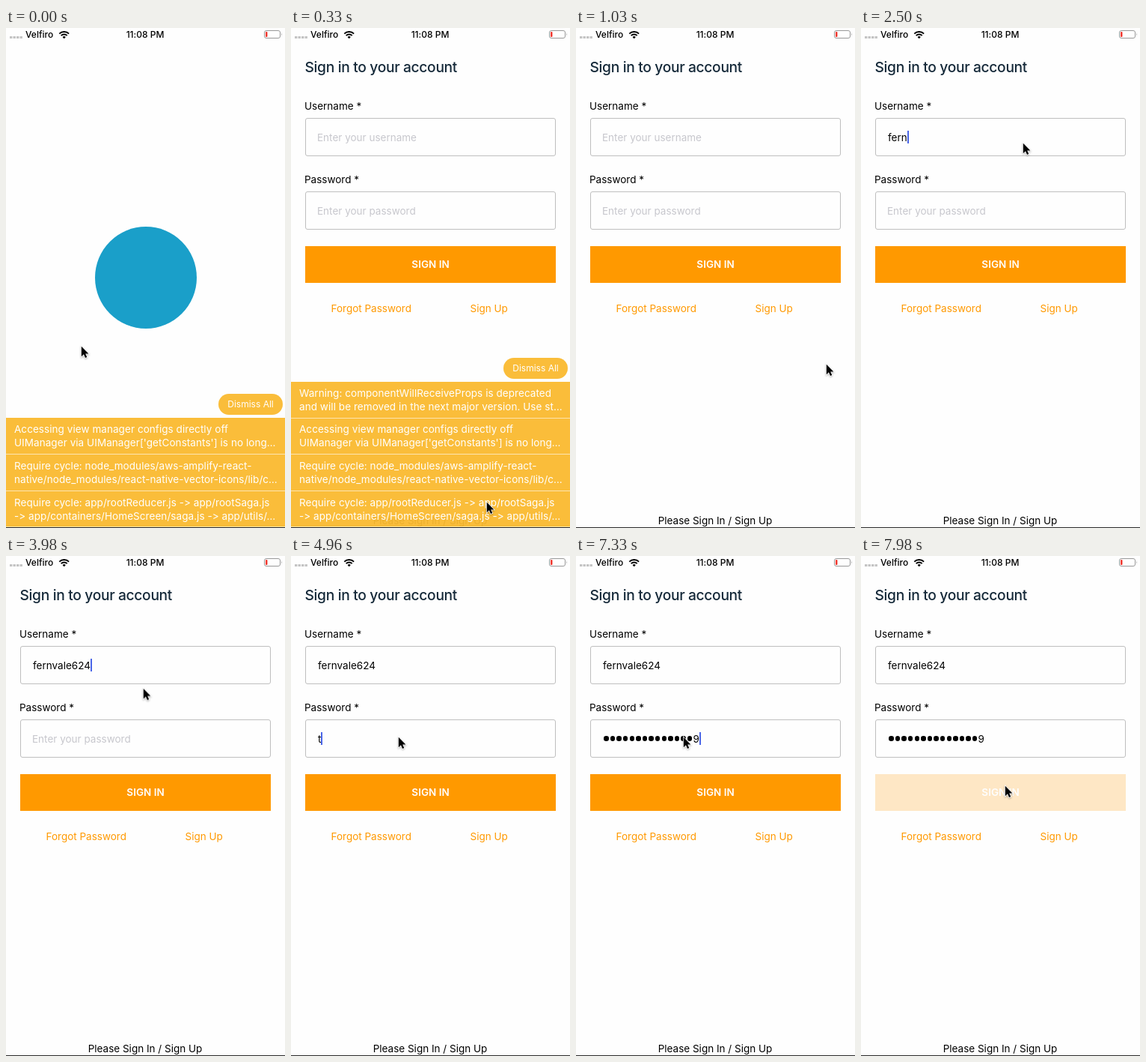
These frames come from a looping animation (373 px wide and 667 px high, 8 s). An HTML page:

```html
<!DOCTYPE html>
<html lang="en">
<head>
<meta charset="utf-8">
<title>Sign in</title>
<style>
  html, body { margin: 0; width: 100%; height: 100%; overflow: hidden; background: #fefefe; }
  body {
    position: relative;
    font: 13.5px/20px Inter, Roboto, sans-serif;
    font-variant-ligatures: none;
    color: #000;
    white-space: pre;
  }
  body * { box-sizing: border-box; }
  .abs, .box, .row, .line, #cursor { position: absolute; }

  /* status bar */
  .status { font-size: 12px; font-weight: 500; top: -1px; }
  .time { left: 0; width: 372px; text-align: center; }
  .icons { left: 0; top: 0; }

  /* splash */
  .mark {
    left: 119px; top: 265px; width: 136px; height: 136px;
    border-radius: 50%; background: #1a9fc9;
    animation: leave 8s step-end infinite;
  }
  @keyframes leave { 0% { visibility: visible; } 1.5%, 100% { visibility: hidden; } }

  /* form */
  .form { inset: 0; animation: enter 8s step-end infinite; }
  @keyframes enter { 0% { visibility: hidden; } 1.5%, 100% { visibility: visible; } }
  h1 {
    margin: 0; left: 18.5px; top: 42px; color: #152939;
    font-size: 19.2px; font-weight: 500; line-height: 20px; letter-spacing: -.32px;
  }
  .box { left: 19px; width: 335px; height: 51px; border: 1px solid #bfbfbf; border-radius: 3px; }
  .hint { left: 35px; color: #c7c7cd; }
  .line { left: 36px; height: 17px; display: flex; align-items: center; }
  .caret { width: 2px; height: 17px; background: #4a66e8; }
  .dot { width: 6.4px; height: 6.4px; margin: 0 1.12px; border-radius: 50%; background: #000; }
  .button {
    left: 19px; top: 291px; width: 335px; height: 49px;
    background: #ff9900; color: #fff; font-weight: 600;
    line-height: 49px; text-align: center;
    animation: press 8s linear infinite;
  }
  @keyframes press { 0%, 98.2% { opacity: 1; } 99.7%, 100% { opacity: .22; } }
  .link { top: 364px; color: #ff9900; }
  .foot { left: 0; width: 372px; top: 647px; text-align: center; }

  /* warnings */
  .alerts { inset: 0; animation: dismiss 8s step-end infinite; }
  @keyframes dismiss { 0% { opacity: 1; } 12.5%, 100% { opacity: 0; } }
  .row, .pill { background: rgba(250, 186, 48, .95); color: #fff; }
  .row {
    left: 0; width: 373px; height: 49px; padding: 6px 0 0 11px;
    border-bottom: 1px solid rgba(255, 255, 255, .6);
    line-height: 18px; letter-spacing: .06px;
  }
  .late { z-index: 1; animation: late 8s step-end infinite; }
  @keyframes late { 0% { opacity: 0; } 2.5%, 100% { opacity: 1; } }
  .pill {
    left: 284px; top: 440px; width: 86px; height: 28px; border-radius: 14px;
    font-size: 12px; line-height: 28px; text-align: center;
    animation: lift 8s step-end infinite;
  }
  @keyframes lift { 0% { transform: translateY(48px); } 2.5%, 100% { transform: none; } }

  .edge { left: 0; top: 666px; width: 100%; height: 1px; background: #2a2a2a; }

  #cursor {
    left: -2px; top: -2px; overflow: visible;
    filter: drop-shadow(0 1px 1px rgba(0, 0, 0, .3));
    animation: move 8s linear infinite;
  }
  @keyframes move {
    0%, .5% { transform: translate(101px, 425px); }
    4.125%, 5.75% { transform: translate(262px, 633px); }
    11.25%, 13.875% { transform: translate(335px, 449px); }
    16.375% { transform: translate(228px, 154px); }
    17.125%, 49% { transform: translate(217px, 154px); }
    49.75% { transform: translate(184px, 177px); }
    54%, 95.25% { transform: translate(144px, 242px); }
    98.25%, 100% { transform: translate(193px, 307px); }
  }
</style>
</head>
<body>
  <div class="abs status" style="left:26px">Velfiro</div>
  <div class="abs status time">11:08 PM</div>
  <svg class="abs icons" width="373" height="20">
    <path d="M5 12.5h17" stroke="#c4c4c4" stroke-width="3" stroke-dasharray="3.4 1.1"/>
    <g fill="none" stroke="#000" stroke-width="2">
      <path d="M71.3 7.6a9 9 0 0 1 12.8 0"/>
      <path d="M73.7 10.1a5.6 5.6 0 0 1 8 0"/>
    </g>
    <path d="M77.7 14.2l-2.1-2.2a3 3 0 0 1 4.2 0z"/>
    <rect x="345.5" y="3.5" width="21" height="10" rx="2.5" fill="none" stroke="#999"/>
    <rect x="347" y="5" width="2.5" height="7" rx="1" fill="#f0382f"/>
    <path d="M368 6.8q1.5 1.7 0 3.4z" fill="#999"/>
  </svg>

  <div class="abs mark"></div>

  <div class="abs form">
    <h1 class="abs">Sign in to your account</h1>
    <div class="abs" style="left:18px;top:94px">Username *</div>
    <div class="box" style="top:120px"></div>
    <div class="abs hint" id="userHint" style="top:136px">Enter your username</div>
    <div class="line" id="user" style="top:137px"></div>
    <div class="abs" style="left:18px;top:192px">Password *</div>
    <div class="box" style="top:218px"></div>
    <div class="abs hint" id="passHint" style="top:234px">Enter your password</div>
    <div class="line" id="pass" style="top:235px"></div>
    <div class="abs button">SIGN IN</div>
    <div class="abs link" style="left:53.5px">Forgot Password</div>
    <div class="abs link" style="left:239.5px">Sign Up</div>
    <div class="abs foot">Please Sign In / Sign Up</div>
  </div>

  <div class="abs alerts">
    <div class="abs pill">Dismiss All</div>
    <div class="row late" style="top:472px">Warning: componentWillReceiveProps is deprecated
and will be removed in the next major version. Use st…</div>
    <div class="row" style="top:520px">Accessing view manager configs directly off
UIManager via UIManager['getConstants'] is no long…</div>
    <div class="row" style="top:569px">Require cycle: node_modules/aws-amplify-react-
native/node_modules/react-native-vector-icons/lib/c…</div>
    <div class="row" style="top:618px;height:48px">Require cycle: app/rootReducer.js -&gt; app/rootSaga.js
-&gt; app/containers/HomeScreen/saga.js -&gt; app/utils/…</div>
  </div>

  <div class="abs edge"></div>

  <svg id="cursor" width="14.4" height="19.8" viewBox="0 0 16 22">
    <path d="M2 2v15l3.5-3.3 2.3 5.2 2.5-1.1-2.3-5h4.7z" stroke="#fff" stroke-width="1.6" paint-order="stroke"/>
  </svg>

<script>
  const LOOP = 8000;
  const $ = id => document.getElementById(id);
  const fields = [
    { id: 'user', text: 'fernvale624', focus: 1600, blur: 4300,
      keys: [2200, 2310, 2400, 2500, 2860, 2920, 3090, 3150, 3330, 3450, 3560] },
    { id: 'pass', text: 'testpassword999', focus: 4300, blur: 7900, secret: true,
      keys: [4910, 5000, 5090, 5170, 5650, 5710, 5890, 6010, 6190, 6280, 6370, 6550, 6970, 7150, 7330] }
  ];

  function drawField(f, t) {
    const n = f.keys.filter(k => k <= t).length;
    const focused = t >= f.focus && t < f.blur;
    const state = n + ' ' + focused;
    if (state === f.state) return;
    f.state = state;
    // only the newest character of a secret stays readable
    const masked = f.secret ? Math.max(0, n - 1) : 0;
    $(f.id).innerHTML = '<i class="dot"></i>'.repeat(masked) +
      '<span>' + f.text.slice(masked, n) + '</span>' +
      (focused ? '<i class="caret"></i>' : '');
    $(f.id + 'Hint').style.display = n ? 'none' : '';
  }

  let start;
  function tick(now) {
    start ??= now;
    const t = (now - start) % LOOP;
    fields.forEach(f => drawField(f, t));
    requestAnimationFrame(tick);
  }
  requestAnimationFrame(tick);
</script>
</body>
</html>
```
